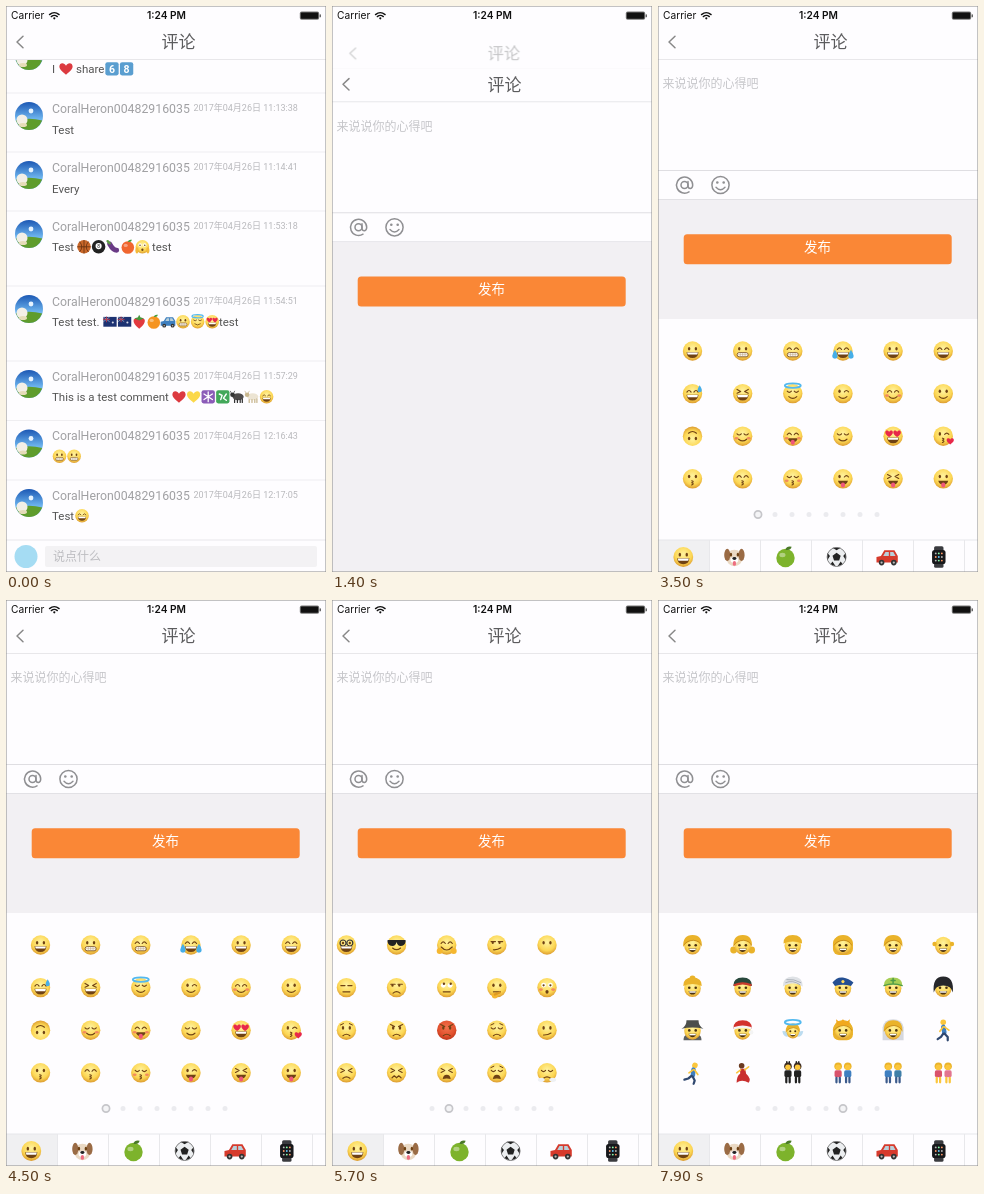
Recreate the animation shown at these times as an HTML page. Size 320 by 566 pixels, loop 8000 ms.

```html
<!DOCTYPE html>
<html lang="zh-CN">
<head>
<meta charset="utf-8">
<title>评论</title>
<style>
html,body{margin:0;width:100%;height:100%;overflow:hidden;background:#fff}
svg{display:block;width:320px;height:566px;font-family:Roboto,'Noto Sans CJK SC','Noto Sans CJK',sans-serif}
.bar{font-family:Inter,sans-serif}
</style>
</head>
<body>
<svg id="stage" viewBox="0 0 320 566"></svg>
<script>
const LOOP = 8000, INK = '#6f4214', PAPER = '#fefdff';

// shape helpers
const fill = (d, c, more = '') => `<path d="${d}" fill="${c}" ${more}/>`;
const line = (d, c = INK, w = 1.15) => `<path d="${d}" fill="none" stroke="${c}" stroke-width="${w}" stroke-linecap="round" stroke-linejoin="round"/>`;
const oval = (x, y, rx, ry, c) => `<ellipse cx="${x}" cy="${y}" rx="${rx}" ry="${ry}" fill="${c}"/>`;
const disc = (x, y, r, c) => oval(x, y, r, r, c);
const ring = (x, y, r, c, w) => `<circle cx="${x}" cy="${y}" r="${r}" fill="none" stroke="${c}" stroke-width="${w}"/>`;
const rect = (x, y, w, h, c, r = 0) => `<rect x="${x}" y="${y}" width="${w}" height="${h}" rx="${r}" fill="${c}"/>`;
const text = (x, y, size, c, s, more = '') => `<text x="${x}" y="${y}" font-size="${size}" fill="${c}" ${more}>${s}</text>`;
const place = (x, y, s, body) => `<g transform="translate(${x} ${y}) scale(${s})">${body}</g>`;
const pair = f => f(-3.4) + f(3.4);
const heart = (x, y, s, c) => place(x, y, s, fill('M0 8C-5 4-9 1-9-3C-9-9-2-9 0-4C2-9 9-9 9-3C9 1 5 4 0 8Z', c));

// faces: first letter eyes, second mouth, the rest extras
const EYES = {
  o: pair(x => oval(x, -2.3, 1.2, 1.8, INK)),
  '^': line('M-5.6-1.5q2.1-3.2 4.2 0M1.4-1.5q2.1-3.2 4.2 0'),
  u: line('M-5.6-2.4q2.1 2.4 4.2 0M1.4-2.4q2.1 2.4 4.2 0'),
  x: line('M-5.6-4.2l3.6 2-3.6 1.8M5.6-4.2l-3.6 2 3.6 1.8'),
  X: line('M-5.4-4.2l3.6 3.4m0-3.4l-3.6 3.4M1.8-4.2l3.6 3.4m0-3.4l-3.6 3.4'),
  '-': line('M-5.6-2h4.2M1.4-2h4.2'),
  h: heart(-4, -2.5, .42, '#e8284a') + heart(4, -2.5, .42, '#e8284a'),
  w: oval(-3.4, -2.3, 1.2, 1.8, INK) + line('M1.4-1.8q2.1-2.6 4.2 0'),
  O: pair(x => disc(x, -2.5, 2.4, '#fff') + disc(x, -2.3, 1.1, INK)),
  S: fill('M-9-5H9V-3Q8 1 4 1Q1 1 0-3Q-1 1-4 1Q-8 1-9-3Z', '#222'),
  g: pair(x => ring(x, -2, 3, '#333', 1.2) + disc(x, -2, 1.2, INK)),
  r: pair(x => disc(x, -2.3, 2.4, '#fff') + disc(x + .6, -3.8, 1.2, INK)),
  l: line('M-5.8-3.4h4.4M1.4-3.4h4.4') + pair(x => oval(x - .7, -2.2, 1.1, 1.3, INK))
};
const MOUTHS = {
  D: fill('M-6 1.2H6Q5.5 7-0 7T-6 1.2Z', INK) + fill('M-5.4 1.5H5.4L4.8 3.6H-4.8Z', '#fff'),
  T: `<rect x="-5.5" y="1.6" width="11" height="4.2" rx="2" fill="#fff" stroke="${INK}" stroke-width=".8"/>` + line('M-5 3.7H5M-2.4 2v3.5M0 2v3.5M2.4 2v3.5', '#b59a70', .5),
  s: line('M-4 3Q0 6.4 4 3'), S: line('M-5.5 2Q0 8 5.5 2'), f: line('M-3.5 5.5Q0 2.6 3.5 5.5'),
  '-': line('M-3.5 4.2h7'), o: oval(0, 4.2, 1.6, 1.9, INK), O: oval(0, 4.6, 2.5, 3.2, INK),
  k: line('M-.8 2q3 .8 0 2q3 .8 0 2.2'), a: line('M-3.5 4.8Q1 5 4 2.8'), n: '',
  p: fill('M-5 2H5Q4 6 0 6T-5 2Z', INK) + rect(-2, 3.6, 4, 5, '#f0567a', 2),
  z: line('M-5.5 4H5', '#888', 2) + line('M-5 4H6', '#ddd', .7) + rect(4, 3, 3.5, 4.5, '#9aa0a6', 1),
  m: fill('M-7 .5Q0-1.5 7 .5V5Q0 10-7 5Z', '#f4f6f8') + line('M-9-1l2 2M9-1l-2 2M-5 3.2H5', '#b9c5cf', .8),
  w: line('M-4.5 5l2.2-2 2.3 2 2.2-2 2.3 2'), t: fill('M-4 6.3Q-3.5 2 0 2T4 6.3Q0 5-4 6.3Z', INK)
};
const BLUE = '#46aee8';
const drop = (x, y, s = 1) => place(x, y, s, fill('M0-3Q4 3 0 3.4Q-4 3 0-3Z', BLUE));
const zed = (x, y, s) => place(x, y, s, line('M-2-2h4l-4 4h4', '#1f5f9f', 1.4));
const mitt = (x, y) => disc(x, y, 3, '#f5b730');
const EXTRAS = {
  c: pair(x => oval(x * 1.8, 2, 1.9, 1.3, '#f28a5d')), d: drop(7.2, -5, 1.1), t: drop(-5, 3.5),
  T: rect(-5, -1, 2.8, 9, BLUE, 1) + rect(2.2, -1, 2.8, 9, BLUE, 1), J: drop(-8, 3, 1.4) + drop(8, 3, 1.4),
  h: `<ellipse cy="-8" rx="8" ry="2.3" fill="none" stroke="#53b9ef" stroke-width="1.8"/>`,
  B: line('M-6-5.2l3-1.4M6-5.2l-3-1.4', INK, 1), A: line('M-6-5.6l4 2M6-5.6l-4 2'),
  y: heart(7, 5, .4, '#e8284a'), N: pair(x => oval(x * 1.7, 7, 3.4, 2.1, '#eef1f4')),
  Z: zed(5, -4, .9) + zed(8.5, -8, 1.1), H: mitt(-7, 6) + mitt(7, 6), K: mitt(-2, 8) + line('M-2 7l5-2', '#e09a20', 2.2),
  M: pair(x => oval(x * 2.3, 5, 2.2, 4.5, '#f3b93a')),
  b: line('M-8-5Q0-9 9-2', '#f4f1ea', 4), q: line('M2 4l6 4', '#dfe5ea', 2) + disc(8, 8, 1.4, '#e8284a'),
  $: text(-5.8, 0, 7, '#2d8c46', '$') + text(1.4, 0, 7, '#2d8c46', '$')
};
const face = code => {
  const base = code.includes('R') ? 'red' : code.includes('v') ? 'cold' : code.includes('V') ? 'imp' : 'sun';
  const body = `<circle r="9.7" fill="url(#${base})"/>` + EYES[code[0]] + MOUTHS[code[1]] +
    [...code.slice(2)].map(k => EXTRAS[k] || '').join('');
  return code.includes('U') ? `<g transform="rotate(180)">${body}</g>` : body;
};

// heads and people
const SKIN = '#fbc63c', HAIR = '#eab32a', DARK = '#4a3010';
const head = (over, under = '') => under + `<ellipse cy=".6" rx="8.3" ry="8.9" fill="url(#sun)"/>` + over +
  pair(x => disc(x * .95, .2, 1.3, DARK)) + fill('M-4 3.6H4Q3 7 0 7T-4 3.6Z', DARK) + rect(-3.2, 3.7, 6.4, 1.4, '#fff');
const bangs = fill('M-9.3 2Q-10-9.8 0-10T9.3 2Q8-3.5 1-4.5Q-6-4-9.3 2Z', HAIR) + line('M-8.6 0Q-6-4.4 1-4.7Q7-4 8.6 0', '#b97f18', .7);
const cap = (c, d = 'M-9.3-1.5Q-9.5-10 0-10T9.3-1.5Q0-5.5-9.3-1.5Z') => fill(d, c);
const legs = (top, low) => place(0, 0, 1.12, disc(0, -7, 2.5, SKIN) + line('M0-3L1 2', top, 4) + line('M1 3l3 3v3M0 3l-2 3-3 2', low, 2) + line('M0-3l-3 4M1-3l4 3', SKIN, 1.5));
const duo = (a, b, hair = HAIR, low = '#3c5b8c') => place(0, 0, 1.12, [[-4.3, a], [4.3, b]].map(([x, k]) => disc(x, -5.8, 3.4, hair) + disc(x, -5, 2.5, SKIN) +
  rect(x - 3.2, -2.2, 6.4, 6.2, k, 1.5) + line(`M${x - 1.5} 4.5v4M${x + 1.5} 4.5v4`, low, 2)).join(''));
const hand = (turn, n) => `<g transform="rotate(${turn})">` + rect(-5, -1, 10, 9.5, SKIN, 4) +
  [-3.7, -1.2, 1.3, 3.8].slice(0, n).map(x => line(`M${x} 1V-7`, SKIN, 2.3) + line(`M${x + 1.2} 0V-6`, '#dd9d22', .4)).join('') +
  line('M-4 4l-4-4', SKIN, 2.5) + '</g>';
const cat = code => fill('M-9-9l6 3H3l6-3v8H-9Z', '#f6b52e') + face(code) + line('M-10 2l5 1M10 2l-5 1', INK, .5);
const square = (c, mark) => rect(-9.5, -9.5, 19, 19, c, 3) + mark;
const digit = n => square('#5a9ed0', text(0, 5.5, 15, '#fff', n, 'text-anchor="middle" font-weight="700"'));
const beast = (c, horn) => oval(1, 0, 8, 5, c) + disc(-7, -3, 3.3, horn) + line('M-4 4v4M0 4v4M4 4v4M7 3v5', horn, 1.8) + line('M-9-6l-1-2M-5-6l1-2', horn, 1);
const car = c => place(0, 0, 1.1, fill('M-10 5V0L-6-1-3-6H6L9-1V5Z', c) + fill('M-4-1l2-3.5H1V-1ZM2.2-1v-3.5H5L7-1Z', '#b9cfd9') + pair(x => disc(x * 1.6, 5, 2.5, '#333') + disc(x * 1.6, 5, 1, '#bbb')));
const fruit = (c, leaf) => disc(0, 1, 9, c) + oval(-3, -2, 3, 2.2, 'rgba(255,255,255,.4)') + fill('M0-7Q1-11 6-10Q5-6 0-7Z', leaf);
const horns = fill('M-10-11q0 5 6 4l-5 5ZM10-11q0 5-6 4l5 5Z', '#6a2f92');

const ART = {
  zzz: zed(-7, 5, 1) + zed(-1, 2, 1.4) + zed(6, -3, 2),
  poo: fill('M0-10Q5-6 4-3Q8-2 6 2Q10 3 9 7Q7 9 0 9T-9 7Q-10 3-6 2Q-8-2-4-3Q-1-6 0-10Z', '#7b4a2c') + pair(x => disc(x * .75, 0, 1.7, '#fff') + disc(x * .75, 0, .8, '#222')) + line('M-3 4.5q3 2.5 6 0', '#fff'),
  imp1: horns + face('oSVA'), imp2: horns + face('ofVA'),
  ogre: disc(0, 0, 9, '#b8392b') + fill('M-8.5-2Q-9-10 0-10T8.5-2Q0-7-8.5-2Z', '#4b2a20') + EYES.O + MOUTHS.T,
  goblin: disc(0, 0, 9, '#d63a2c') + EYES.O + line('M0-1l5 4', '#a92219', 3) + MOUTHS.f,
  skull: oval(0, -1, 8, 8, '#e4e6e8') + rect(-5, 4, 10, 5, '#e4e6e8', 2) + pair(x => disc(x, 0, 2.2, '#333')),
  ghost: fill('M-8 9V-2Q-8-9 0-9T8-2V9l-4-2-4 2-4-2Z', '#e7ebef') + EYES.o + MOUTHS.p,
  alien: fill('M0 9Q-9 2-8-4Q-6-9 0-9T8-4Q9 2 0 9Z', '#b4bac0') + pair(x => oval(x, 0, 2, 3, '#222')),
  robot: rect(-8, -7, 16, 15, '#9fb3bf', 3) + EYES.O + MOUTHS.T,
  cat1: cat('oD'), cat2: cat('^D'), cat3: cat('^DJ'), cat4: cat('hD'), cat5: cat('la'), cat6: cat('uk'), cat7: cat('OO'), cat8: cat('oft'), cat9: cat('ofA'),
  palm: hand(0, 4), wave: hand(-20, 4), up: hand(0, 1), down: hand(180, 1), left: hand(-90, 1), right: hand(90, 1), fist: hand(0, 0), two: hand(0, 2), three: hand(8, 3), arm: hand(60, 0),
  lips: fill('M-9 0Q-4-6 0-3Q4-6 9 0Q5 6 0 6T-9 0Z', '#d8324a') + line('M-7 0H7', '#8c1f30', 1),
  tongue: rect(-5, -8, 10, 17, '#f0667a', 5) + line('M0-7V3', '#c7445a', 1),
  ear: oval(0, 0, 6, 9, SKIN) + line('M-2 4Q4 0 1-5Q-3-5-3 0', '#d5921e'), nose: fill('M0-9Q3 1 7 4Q5 9 0 7T-7 4Q-3 1 0-9Z', SKIN),
  eye: oval(0, 0, 9, 5.5, '#eee') + disc(0, 0, 4, '#6b4a2c') + disc(0, 0, 2, '#111'), eyes: pair(x => oval(x * 1.2, 0, 3.8, 6, '#eee') + disc(x * 1.2 - 1, 1, 2, '#222')),
  bust: disc(0, -3, 5, '#55748c') + fill('M-9 9Q-8 2 0 2T9 9Z', '#55748c'),
  baby: head(line('M-1-8q3-2 3 1', HAIR)),
  boy: head(bangs), girl: head(bangs, disc(-9, 5, 3.4, HAIR) + disc(9, 5, 3.4, HAIR)),
  man: head(cap(HAIR)), woman: head(bangs, rect(-10, -8, 20, 18, HAIR, 6)),
  blond: head(bangs), old: head(disc(-8.7, -1, 2.2, HAIR) + disc(8.7, -1, 2.2, HAIR)), granny: head(cap(HAIR), disc(0, -9, 3, HAIR)),
  pao: head(cap('#28483c') + line('M-8-2.5Q0-6 8-2.5', '#c83a2c', 2.2)), turban: head(cap('#dfe2e6', 'M-10-1Q-10-11 0-11T10-1Q3-5 0-4Q-3-5-10-1Z') + line('M-7-5Q0-8 7-3M-6-8Q1-9 8-5', '#a5abb3', .9)),
  police: head(cap('#244f92', 'M-10.5-5Q-6-11 0-10T10.5-5L8-1.5Q0-4-8-1.5Z') + disc(0, -6, 1.6, '#ffd95a')), worker: head(cap('#a7cf55') + line('M-9-2Q0-5 9-2M0-9v5M-2-7h4', '#4d9b48', 1.5)),
  guard: head(cap('#26272b', 'M-9.5 5Q-11-11 0-11T9.5 5Q8-2 0-2T-9.5 5Z')), spy: head(cap('#4c4f4c', 'M-11-1.5Q-6-4-6-10H6Q6-4 11-1.5Q0-4-11-1.5Z'), fill('M-9 10Q-9 4-4 5H4Q9 4 9 10Z', '#5b5f60')),
  santa: head(cap('#d3322e') + line('M-8-2Q0-5 8-2', '#f4f4f4', 2.4)) + disc(8.5, 2, 2.2, '#f4f4f4'),
  angel: fill('M-10.5 1Q-6 0-4 6Q-9 8-10.5 1ZM10.5 1Q6 0 4 6Q9 8 10.5 1Z', '#bcdcf0') + place(0, 1, .76, head(bangs)) + EXTRAS.h,
  queen: head(bangs + fill('M-6-5L-7-11l4 3 3-3 3 3 4-3-1 6Z', '#f2a91e'), rect(-10, -7, 20, 17, HAIR, 6)),
  bride: head(bangs, fill('M-10.5 10V-3Q-9-11 0-11T10.5-3V10Z', '#d5d8df')),
  walk: legs('#3f7fc0', '#30486f'), run: `<g transform="rotate(18)">${legs('#3f7fc0', '#30486f')}</g>`,
  dance: disc(-1, -7, 2.8, '#6b3a20') + fill('M-2.5-4H2.5L3.5 1Q9 6 6 10Q-1 6-6 10Q-6 3-2.5 1Z', '#c92f2f') + line('M2-3l4-3M-2-3l-4 3', SKIN, 1.5),
  bunnies: duo('#222', '#222', '#3c2a22', '#222') + line('M-6-10v-1M-3.5-10v-1M3.5-10v-1M6-10v-1', '#222', 1.5),
  pair1: duo('#d9536c', '#3f7fc0'), pair2: duo('#3f7fc0', '#3f7fa8'), pair3: duo('#d9536c', '#e27590', HAIR, SKIN),
  dog: oval(0, 1, 8, 8, '#ead9c4') + oval(-7, -2, 3, 6, '#9a6b45') + oval(7, -2, 3, 6, '#9a6b45') + EYES.o + oval(0, 3, 3.8, 3, '#fff') + oval(0, 1.5, 2, 1.4, '#222') + rect(-1.5, 4, 3, 4.5, '#ee6d80', 1.5),
  apple: fruit('#7db32c', '#4a7a28'), orange: fruit('#f59421', '#4a9a38'), tomato: fruit('#f0662f', '#3f9a3c'),
  ball: disc(0, 0, 9.5, '#eceef0') + fill('M0-4.2l4 3-1.5 4.7h-5L-4-1.2ZM-4-9H4L0-6.5ZM9-4V3L6.5-1ZM-9-4V3l2.5-4ZM-6 7l2-2.5L-1 9ZM6 7L4 4.5 1 9Z', '#222') + ring(0, 0, 9.3, '#555', .7),
  car: car('#d63a2c'), jeep: car('#3e7fbf'),
  watch: rect(-4.6, -10.5, 9.2, 21, '#3a3b3f', 1.5) + rect(-6.6, -6.8, 13.2, 13.6, '#17181b', 2.5) + [-3, 0, 3].map((x, i) => [-3.5, 0, 3.5].map((y, j) => disc(x, y, .9, ['#bbb', '#8fa', '#f96', '#6cf'][(i + j * 2) % 4])).join('')).join(''),
  hoop: disc(0, 0, 9.7, '#c9672a') + line('M-9 0H9M0-9V9M-6-7Q0 0-6 7M6-7Q0 0 6 7', '#55290e', 1), eight: disc(0, 0, 9.7, '#222') + disc(0, -1, 4.4, '#fff') + text(0, 1.8, 7, '#222', '8', 'text-anchor="middle"'),
  aubergine: line('M-5-4Q0 5 5 5', '#6a3a86', 7) + line('M-8-8l3 3', '#5b9a42', 3.5),
  flag: rect(-9.5, -7, 19, 14, '#1c3272') + line('M-9-6.5l8 6M-1-6.5l-8 6', '#d5d9e6', .8) + line('M-9.5-3.5h9M-5-7v7', '#c8394a', 1.1) + disc(4, 1, 1.5, '#d5d9e6'),
  berry: fill('M0 10Q-9 3-8-3Q-4-7 0-5Q4-7 8-3Q9 3 0 10Z', '#e23a3f') + fill('M-7-5l5-1 2-4 2 4 5 1-7 3Z', '#46983d'),
  heart: heart(0, 0, 1.05, '#dc3a40'), gold: heart(0, 0, 1.05, '#fbd84a'),
  atom: square('#8b5bb8', line('M-6-4Q0 0 6 4M-6 4Q0 0 6-4M0-7V7', '#fff', 1.8)), green: square('#43a85a', line('M-5-4l4 2-2 6M5 5L1 2l4-6', '#fff', 2)),
  ox: beast('#4d4a4a', '#333'), sheep: beast('#ece4d3', '#c8b68e'), six: digit(6), key8: digit(8)
};
const emoji = (x, y, s, key) => place(x, y, s, ART[key] || face(key));

const PAGES = [
  'oD oT ^T ^DJ oD ^D ^Dd xD ush ws ^sc os osU usc ^pc us hD wky ok ^k ukc wp xp op',
  'oS$ gD Ss ^SH la on o- -- lf r- o-K Ooc uf ofB ofA ofAR ufB oa of xf xw xt utB ufN',
  'oo OOvM Ofv ofvt ooB of ofB oft oftB uot ufd utT Xo Xo oz um ofq ofb uoZ zzz poo imp1 imp2 ogre',
  'goblin skull ghost alien robot cat1 cat2 cat3 cat4 cat5 cat6 cat7 cat8 cat9 palm palm wave up down fist fist two three palm',
  'palm arm palm up up down left right up palm two palm right palm lips tongue ear nose eye eyes bust bust bust baby',
  'boy girl man woman blond old granny pao turban police worker guard spy santa angel queen bride walk run dance bunnies pair1 pair2 pair3'
];
const pageArt = (s, n) => `<g id="page${n}">` + s.split(' ').map((k, i) => emoji(34.5 + i % 6 * 50.15, 345 + (i / 6 | 0) * 42.6, 1, k)).join('') + '</g>';

// comment list: divider y, time, text runs, emoji runs
const ROWS = [
  [27, '11:12:05', [[46, 'I'], [70, 'share']], [[60, 'heart'], [106, 'six key8']]],
  [87, '11:13:38', [[46, 'Test']], []],
  [146, '11:14:41', [[46, 'Every']], []],
  [205, '11:53:18', [[46, 'Test'], [146, 'test']], [[78, 'hoop eight aubergine tomato OoM']]],
  [280, '11:54:51', [[46, 'Test test.'], [213, 'test']], [[104, 'flag flag berry orange jeep oT ush hD']]],
  [355, '11:57:29', [[46, 'This is a test comment']], [[173, 'heart gold atom green ox sheep ^D']]],
  [414.5, '12:16:43', [], [[53.5, 'oT oT']]],
  [474, '12:17:05', [[46, 'Test']], [[76, '^D']]]
];
const avatar = `<circle r="14" fill="url(#sky)"/>` + fill('M-13.2 4.5Q0 1 13.2 4.5Q9 14 0 14T-13.2 4.5Z', '#5f9c2c') + disc(2, -5, 2.4, '#e6f3ff') + oval(-7, 4, 5.5, 5.5, '#f3efe6') + oval(-6, 9, 4, 2, '#e5dcb8');
const row = ([y, time, runs, pics]) => rect(0, y - .5, 320, 1, '#efeef1') + place(23, y + 23, 1, avatar) +
  text(46, y + 19.7, 12.3, '#a0a0a3', 'CoralHeron00482916035') + text(187.5, y + 18.3, 9, '#b8b8bc', '2017年04月26日 ' + time) +
  runs.map(([x, s]) => text(x, y + (pics.length ? 40 : 41), 11.5, '#555', s)).join('') +
  pics.map(([x, s]) => s.split(' ').map((k, i) => emoji(x + i * 14.6, y + 35.8, .7, k)).join('')).join('');

const header = line('M17 30.3L11 36l6 5.7', '#888', 1.5) + text(155.5, 42.3, 17, '#5c5c5e', '评论') + rect(0, 53, 320, 1, '#e8e7ea');
const grad = (id, a, b, c) => `<radialGradient id="${id}" cy=".36" r=".66"><stop stop-color="${a}"/><stop offset=".65" stop-color="${b}"/><stop offset="1" stop-color="${c}"/></radialGradient>`;
const TABS = 'oD dog apple ball car watch'.split(' ');
const GRAY = '#8f8f92';

document.getElementById('stage').innerHTML = '<defs>' +
  grad('sun', '#fff3a0', '#fcd653', '#d9962c') + grad('red', '#f2734c', '#e2512e', '#b93318') + grad('imp', '#a866cc', '#8c4bb4', '#6a2f92') +
  `<linearGradient id="cold" x2="0" y2="1"><stop stop-color="#4a7fc8"/><stop offset=".5" stop-color="#fbd659"/><stop offset="1" stop-color="#eab040"/></linearGradient>
  <linearGradient id="sky" x2="0" y2="1"><stop stop-color="#1c58b4"/><stop offset=".6" stop-color="#6db4ee"/></linearGradient></defs>` +
  rect(0, 0, 320, 566, PAPER) +
  '<g id="list">' + ROWS.map(row).join('') + rect(0, 0, 320, 53, PAPER) + header +
    rect(0, 533.5, 320, 33, PAPER) + rect(0, 533.5, 320, 1, '#e9e8eb') + disc(20, 550.5, 11.5, '#a5dcf3') +
    rect(39, 540, 272, 21, '#f3f2f4', 2) + text(47, 555, 12, '#bdbdc1', '说点什么') + '</g>' +
  '<g id="composer">' + rect(0, 20, 320, 546, '#f2f0f3') + rect(0, 20, 320, 174, PAPER) + header +
    text(4.5, 82.3, 12, '#c6c6ca', '来说说你的心得吧') + rect(0, 164, 320, 1, '#dfdee2') + rect(0, 193, 320, 1, '#e2e1e5') +
    ring(26.5, 179, 3.5, GRAY, 1.5) + line('M30 175.5v4.7q.3 2.5 2.5 2.3q2.2-.5 2.2-3.5A8.1 8.1 0 1 0 31 185.9', GRAY, 1.5) +
    '<g id="smile">' + ring(62.5, 179, 8.6, GRAY, 1.5) + disc(59.3, 176.5, 1.3, GRAY) + disc(65.7, 176.5, 1.3, GRAY) + line('M58 181.2q4.5 5 9 0', GRAY, 1.4) + '</g>' +
    rect(25.7, 228.3, 268, 30, '#fa8736', 3.5) + text(146, 245.8, 13.5, '#fff', '发布') + '</g>' +
  '<g id="panel">' + rect(0, 313, 320, 253, PAPER) + PAGES.map(pageArt).join('') +
    [...Array(8)].map((_, i) => disc(100 + i * 17, 508.5, 2.5, '#ebebef')).join('') +
    `<circle id="dot" cy="508.5" r="3.6" fill="#f4f4f6" stroke="#c6c6ca" stroke-width="1.7"/>` +
    rect(0, 534, 51, 32, '#f0f0f2') + rect(0, 533.5, 320, 1, '#e8e8eb') +
    TABS.map((k, i) => rect(51 * (i + 1), 534, 1, 32, '#e8e8eb') + emoji(25.3 + i * 51.1, 551, 1.02, k)).join('') + '</g>' +
  text(5, 13.3, 10.2, '#111', 'Carrier', 'class="bar"') + line('M43.5 8.6q4.8-4 9.6 0M45.3 10.6q3-2.4 6 0', '#111', 1.4) + disc(48.3, 12.3, 1.1, '#111') +
  text(160.5, 13.3, 10.2, '#111', '1:24 PM', 'class="bar" font-weight="600" text-anchor="middle"') +
  rect(293.8, 5.6, 19.4, 8.2, '#777', 1.8) + rect(294.8, 6.6, 17.4, 6.2, '#111', .8) + rect(313.6, 8.3, 1.3, 3, '#555', .6) +
  `<rect x=".25" y=".25" width="319.5" height="565.5" fill="none" stroke="#888" stroke-width=".5"/>`;

const $ = id => document.getElementById(id);
const clamp = v => Math.min(1, Math.max(0, v));
const quad = u => u < .5 ? 2 * u * u : 1 - 2 * (1 - u) ** 2;
const cubic = u => u < .5 ? 4 * u ** 3 : 1 - 4 * (1 - u) ** 3;
const show = (id, on) => $(id).style.display = on ? '' : 'none';
const move = (id, x, y) => $(id).setAttribute('transform', `translate(${x} ${y})`);

// overdamped spring: distance still to go
const left = s => s <= 0 ? 1 : 1.1934 * Math.exp(-12.1 * s) - .1934 * Math.exp(-66.9 * s);
// start, duration, offset at which the next page is drawn
const SWIPES = [[4800, 450, 312], [5530, 450, 312], [6720, 320, 160], [7040, 320, 160], [7360, 330, 160]];

function draw(t) {
  const rest = left((t - 1172) / 1000), p = 1 - rest;
  show('list', t < 1850);
  $('list').setAttribute('transform', `translate(160 283) scale(${1 - .05 * p}) translate(-160 -283)`);
  $('list').setAttribute('opacity', 1 - .7 * p);
  show('composer', t > 1172);
  move('composer', 0, t > 1850 ? 0 : 566 * rest);
  $('smile').setAttribute('opacity', 1 - .8 * clamp((t - 2350) / 150) + .8 * clamp((t - 2650) / 250));

  show('panel', t > 2640);
  move('panel', 0, 253 * (1 - quad(clamp((t - 2640) / 500))));
  let page = 0, off = 0, reveal = 320;
  for (const [start, span, at] of SWIPES) {
    if (t >= start + span) page++;
    else if (t > start) { off = 320 * cubic((t - start) / span); reveal = at; }
  }
  PAGES.forEach((_, i) => {
    show('page' + i, i === page || (i === page + 1 && off > reveal));
    move('page' + i, (i - page) * 320 - off, 0);
  });
  $('dot').setAttribute('cx', 100 + page * 17);
}

function tick() {
  draw(performance.now() % LOOP);
  requestAnimationFrame(tick);
}
tick();
</script>
</body>
</html>
```
